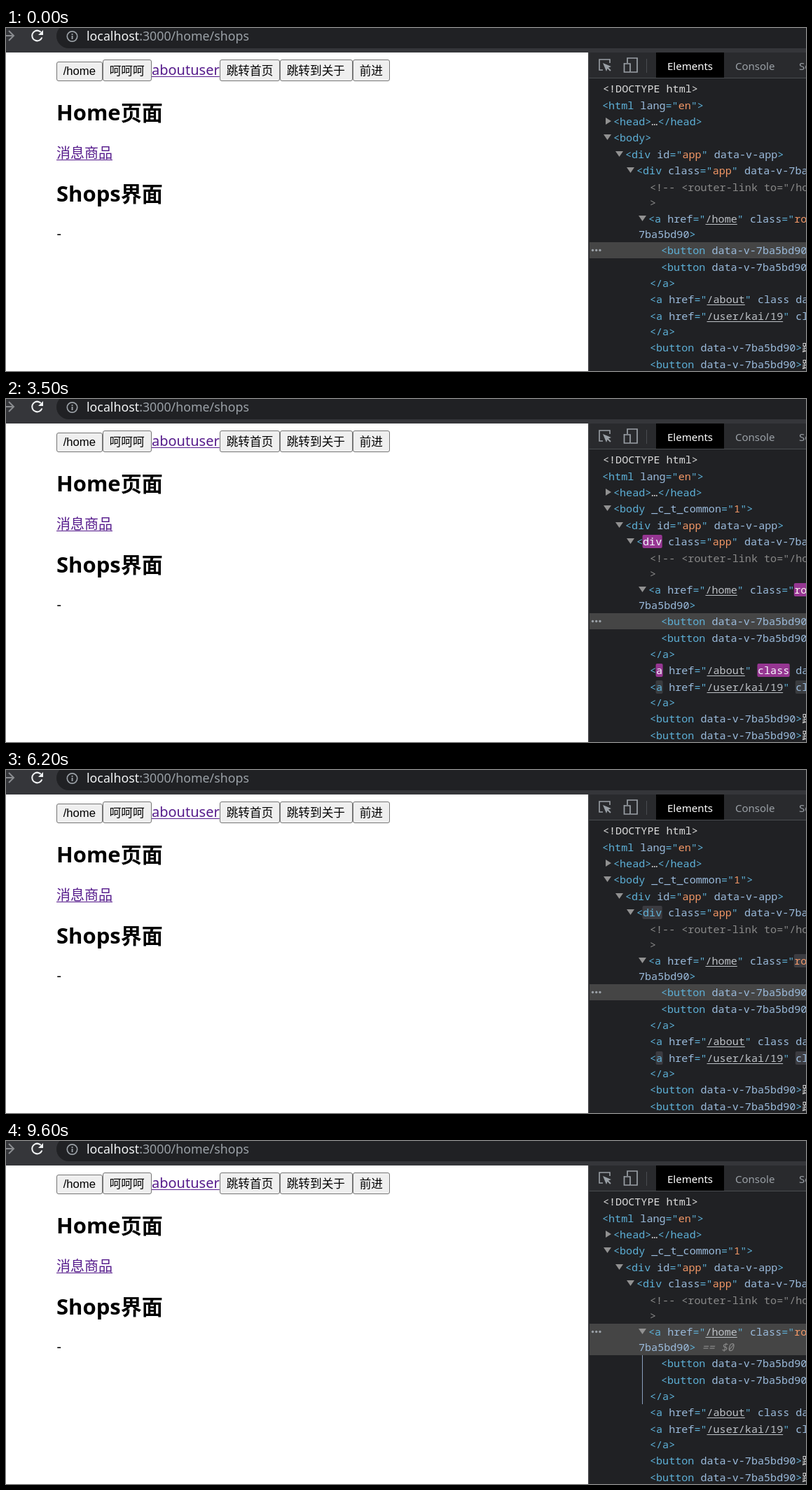
Write an HTML page with a canvas that moves like this. It is 1142 by 490 pixels and loops after 9700 ms.

```html
<!DOCTYPE html>
<html lang="zh">
<head>
<meta charset="utf-8">
<style>
html, body { margin: 0; width: 100%; height: 100%; overflow: hidden; background: #fff; }
canvas { display: block; width: 1142px; height: 490px; }
</style>
</head>
<body>
<canvas id="stage" width="1142" height="490"></canvas>
<script>
const ctx = document.getElementById('stage').getContext('2d');
const LOOP = 9700, STEP = 100, FLASH = 1400;
const SANS = '"Noto Sans", "Noto Sans CJK SC", "Noto Sans CJK", sans-serif';
const ARIAL = '"Liberation Sans", "Noto Sans CJK SC", "Noto Sans CJK", sans-serif';
const MONO = '15.1px "Noto Sans Mono", "Noto Sans CJK SC", "Noto Sans CJK", monospace';
const PANEL = '#202124';
const INK = { t: '#5db0d7', n: '#9bbbdc', v: '#f29766', l: '#bdc1c6', g: '#898989', w: '#dcdcdc', i: '#898989' };

// [start, state] lists
const PAGES = [[0, 'home'], [1700, 'user'], [2300, 'about'], [3300, 'home'], [4200, 'user'], [5200, 'home']];
const HOVERS = [[0, null], [6600, 'first'], [7100, 'link'], [7200, 'first'], [7700, 'second'],
  [7800, 'first'], [8300, 'link'], [8700, null]];
const FLASHES = {
  app: [1800, 2400, 3400, 4300, 5300], body: [1800],
  homeOff: [1800, 4300], homeOn: [3400, 5300],
  aboutOn: [2400], aboutOff: [3400],
  userOn: [1800, 4300], userOff: [2400, 5300]
};
const URLS = { home: '/home/shops', about: '/about', user: '/user/kai/19' };
const TARGETS = {
  first: { x: 72, y: 48, w: 66.3, h: 28, frame: true, name: 'button', size: '53.05 × 22' },
  second: { x: 138, y: 45, w: 70, h: 31, frame: true, name: 'button', size: '56 × 24.8' },
  link: { x: 72, y: 47, w: 136, h: 27, name: 'a', cls: '.router-link-active', size: '109.05 × 21' }
};

const stateAt = (list, t) => list.reduce((now, [start, s]) => t >= start ? s : now, list[0][1]);

function rect(x, y, w, h, fill) {
  ctx.fillStyle = fill;
  ctx.fillRect(x, y, w, h);
}
function round(x, y, w, h, r, fill, stroke) {
  ctx.beginPath();
  ctx.roundRect(x, y, w, h, r);
  if (fill) { ctx.fillStyle = fill; ctx.fill(); }
  if (stroke) { ctx.strokeStyle = stroke; ctx.lineWidth = 1; ctx.stroke(); }
}
function text(s, x, y, font, fill) {
  ctx.font = font;
  ctx.fillStyle = fill;
  ctx.fillText(s, x, y);
  return ctx.measureText(s).width;
}
function lines(color, width, ...paths) {
  ctx.strokeStyle = color;
  ctx.lineWidth = width;
  for (const p of paths) {
    ctx.beginPath();
    for (let i = 0; i < p.length; i += 2) ctx.lineTo(p[i], p[i + 1]);
    ctx.stroke();
  }
}
function poly(fill, ...p) {
  ctx.beginPath();
  for (let i = 0; i < p.length; i += 2) ctx.lineTo(p[i], p[i + 1]);
  ctx.fillStyle = fill;
  ctx.fill();
}
function ring(x, y, r, color, width, from = 0, to = Math.PI * 2) {
  ctx.beginPath();
  ctx.arc(x, y, r, from, to);
  ctx.strokeStyle = color;
  ctx.lineWidth = width;
  ctx.stroke();
}
function mix(a, b, k) {
  const part = (c, i) => parseInt(c.slice(1 + 2 * i, 3 + 2 * i), 16);
  return `rgb(${[0, 1, 2].map(i => Math.round(part(a, i) + (part(b, i) - part(a, i)) * k))})`;
}
// CSS "ease", solved by bisection
function ease(x) {
  const bez = (a, b, u) => 3 * a * u * (1 - u) ** 2 + 3 * b * u * u * (1 - u) + u ** 3;
  let lo = 0, hi = 1;
  for (let i = 0; i < 20; i++) {
    const mid = (lo + hi) / 2;
    if (bez(.25, .25, mid) < x) lo = mid; else hi = mid;
  }
  return bez(.1, 1, lo);
}

function drawBrowserBar(page) {
  rect(0, 0, 1142, 35, '#35363a');
  round(72, -6, 1100, 35, 17.5, PANEL);
  lines('#8a8c90', 2, [-4, 11, 11, 11], [4, 4, 11, 11, 4, 18]);
  ring(44.5, 11, 7.3, '#f1f3f4', 2.1, .35, 5.5);
  poly('#f1f3f4', 53, 3, 53, 10, 46, 10);
  ring(94.5, 12, 7.2, '#9aa0a6', 1.7);
  rect(93.6, 11, 1.9, 5, '#9aa0a6');
  rect(93.6, 8, 1.9, 1.9, '#9aa0a6');
  const font = '17.8px ' + SANS;
  const w = text('localhost', 115, 18, font, '#f1f3f4');
  text(':3000' + URLS[page], 115 + w, 18, font, '#9aa0a6');
}

function button(label, x, y, w) {
  round(x + .5, y + .5, w - 1, 75 - y, 2.5, '#efefef', '#767676');
  text(label, x + 9.7, 67, '16.67px ' + ARIAL, '#000');
}
function anchor(label, x, y) {
  const w = text(label, x, y, '20px ' + SANS, '#551a8b');
  rect(x, y + 2, w, 1, '#551a8b');
  return w;
}
// Latin runs are set slightly larger than Chinese ones.
function heading(s, x, y) {
  for (const run of s.match(/[\x20-\x7e]+|[^\x20-\x7e]+/g)) {
    const size = run < '\x7f' ? 31 : 30;
    x += text(run, x, y, `bold ${size}px ${SANS}`, '#000');
  }
}

function drawPage(page) {
  rect(0, 35, 832, 455, '#fff');
  button('/home', 72, 48, 66);
  button('呵呵呵', 138, 45, 70);
  const w = anchor('about', 208, 67);
  anchor('user', 208 + w, 67);
  button('跳转首页', 305, 45, 86);
  button('跳转到关于', 391, 45, 104);
  button('前进', 495, 45, 53);
  if (page === 'user') heading('欢迎你:kai-19', 72, 132);
  else if (page === 'about') heading('About界面', 72, 132);
  else {
    heading('Home页面', 72, 132);
    anchor('消息商品', 72, 186);
    heading('Shops界面', 72, 248);
    text('-', 72.5, 301, '20px ' + SANS, '#000');
  }
}

function drawInspect(target) {
  const { x, y, w, h, frame, name, cls = '', size } = target;
  const content = 'rgba(111,168,220,.66)';
  if (frame) {
    const band = (dx, dy, dx2, dy2, fill) => {
      ctx.beginPath();
      ctx.rect(x + dx, y + dy, w - 2 * dx, h - 2 * dy);
      ctx.rect(x + dx2, y + dy2, w - 2 * dx2, h - 2 * dy2);
      ctx.fillStyle = fill;
      ctx.fill('evenodd');
    };
    band(0, 0, 2.5, 2.5, 'rgba(255,229,153,.66)');
    band(2.5, 2.5, 10, 3.8, 'rgba(147,196,125,.55)');
    rect(x + 10, y + 3.8, w - 20, h - 7.6, content);
  } else rect(x, y, w, h, content);

  const bold = 'bold 15px ' + SANS, plain = '15px ' + SANS;
  ctx.font = bold;
  const nameW = ctx.measureText(name + cls).width;
  ctx.font = plain;
  const boxW = nameW + ctx.measureText(size).width + 35.5;
  ctx.save();
  ctx.shadowColor = 'rgba(0,0,0,.32)';
  ctx.shadowBlur = 8;
  ctx.shadowOffsetY = 1;
  round(x, 85, boxW, 37.5, 3, '#fff');
  ctx.restore();
  poly('#fff', x + 14, 86, x + 23.5, 76.5, x + 33, 86);
  const tagW = text(name, x + 11, 111, bold, '#881280');
  text(cls, x + 11 + tagW, 111, bold, '#1a1aa6');
  text(size, x + 24.5 + nameW, 111, plain, '#737373');
}

// Row markup: "|" starts a piece, its first letter is the ink, "@key" makes it flash.
const ID = '|n data-v-7ba5bd90';
const attr = (name, value, ink = 'v') => `|n ${name}|t="|${ink}${value}|t"`;
const href = path => attr('href', path, 'l');
const cls = value => `|n class|t="|v${value}`;

function domRows(page, marked, selected) {
  const tail = selected === 'link' ? '|i == $0' : '';
  const plainButton = 't<button' + ID + '|t>';
  const close = 't</a|t>';
  const rows = [
    [852, 92, 'w<!DOCTYPE html>'],
    [851, 116, 't<html' + attr('lang', 'en') + '|t>'],
    [867, 139, 't<head>|w…|t</head>', 'right'],
    [867, 162, 't<body' + (marked ? attr('_c_t_common', '1@body') : '') + '|t>', 'down'],
    [884, 186, 't<div' + attr('id', 'app') + '|n data-v-app|t>', 'down'],
    [900, 209, 't<|tdiv@app' + attr('class', 'app') + ID + '|t>', 'down'],
    [919, 233, 'g<!-- <router-link to="/home"'],
    [919, 255, 'g>']
  ];
  const home = 't<a' + href('/home'), about = href('/about'), user = href(URLS.user);
  if (page === 'home') rows.push(
    [917, 278, home + cls('router-link-active@homeOn') + '|t"', 'down'],
    [903, 300, 'n7ba5bd90|t>' + tail]);
  else rows.push([917, 278, home + '|n |nclass@homeOff' + ID, 'down']);
  const d = page === 'home' ? 0 : -22;
  rows.push([935, 323 + d, plainButton], [935, 347 + d, plainButton], [919, 370 + d, close]);

  if (page === 'about') rows.push(
    [919, 371, 't<a' + about + cls('router-@aboutOn')],
    [919, 393, 'vlink-exact-active@aboutOn|t"' + ID],
    [919, 415, 'vage@aboutOn|t">|wabout|t</a>']);
  else rows.push([919, 393 + d, 't<|ta@aboutOff' + about + '|n |nclass@aboutOff' + ID]);

  if (page === 'user') rows.push(
    [919, 395, 't<a' + user + cls('r')],
    [919, 417, 'vouter-link-exact-active@userOn|t"' + ID],
    [919, 439, 'ncurrent|t="|vpage@userOn|t">|wuser|t</a>']);
  else {
    const y = page === 'about' ? 439 : 417;
    rows.push([919, y, 't<|ta@userOff' + user + '|n |nclass@userOff' + ID], [919, y + 22, close]);
  }
  const y = page === 'about' ? 484 : 462;
  rows.push([919, y, plainButton + '|w跳转首页'], [919, y + 24, plainButton + '|w跳转到关于']);
  return rows;
}

function flashAge(key, t) {
  const start = (FLASHES[key] || []).filter(s => s <= t).pop();
  return start === undefined ? 1 : (t - start) / FLASH;
}

function drawRow([x, y, markup, arrow], t) {
  if (arrow === 'right') poly('#919191', x - 11, y - 11, x - 3, y - 6, x - 11, y - 1);
  if (arrow === 'down') poly('#919191', x - 14, y - 10, x - 3, y - 10, x - 8.5, y - 2);
  for (const piece of markup.split('|')) {
    const [body, key] = piece.split('@');
    const ink = body[0], s = body.slice(1);
    const font = (ink === 'i' ? 'italic ' : '') + MONO;
    ctx.font = font;
    const w = ctx.measureText(s).width;
    const age = key ? flashAge(key, t) : 1;
    let color = INK[ink];
    if (age < 1) {
      const k = ease(Math.min(1, age / .8));
      const fill = age < .8 ? mix('#9e3699', '#3a3c3f', k) : mix('#3a3c3f', PANEL, (age - .8) / .2);
      round(x - .5, y - 15, w + 1, 19, 2, fill);
      color = mix('#ffffff', color, k);
    }
    text(s, x, y, font, color);
    if (ink === 'l') rect(x, y + 2, w, 1, color);
    x += w;
  }
}

function drawToolbar() {
  rect(832, 35, 310, 37, '#292a2d');
  rect(832, 71, 310, 1, '#494c50');
  const gray = '#9aa0a6';
  lines(gray, 1.6, [852, 60, 847, 60, 847, 45, 862, 45, 862, 50]);
  poly(gray, 852, 50, 864, 55, 859, 57, 857, 62);
  lines(gray, 2, [858, 56, 863, 61]);
  lines(gray, 1.7, [887, 50, 887, 43, 901, 43, 901, 63, 892, 63], [882.5, 51, 891, 51, 891, 63, 882.5, 63, 882.5, 50]);
  rect(914, 44, 1, 20, '#494c50');
  rect(928, 35, 97, 36, '#000');
  const font = '15px ' + SANS;
  text('Elements', 944, 60, font, '#fff');
  text('Console', 1041, 60, font, gray);
  text('Sources', 1132, 60, font, gray);
}

function drawPanel(t, page, hover) {
  rect(832, 35, 310, 455, PANEL);
  drawToolbar();
  const selected = t >= 8500 ? 'link' : 'first';
  const focused = t >= 7400 && t < 9600;
  const top = page === 'home' ? 306 : 284;
  const bands = { link: [261, 45], first: [top, 23], second: [top + 23, 24] };
  const band = (name, fill) => rect(833, bands[name][0], 309, bands[name][1], fill);
  if (hover && hover !== selected) band(hover, '#252b36');
  band(selected, focused ? '#043f6f' : '#454545');
  for (let i = 0; i < 3; i++) {
    ctx.beginPath();
    ctx.arc(837.5 + i * 5.2, bands[selected][0] + 11.5, 1.7, 0, 7);
    ctx.fillStyle = '#9aa0a6';
    ctx.fill();
  }
  if (selected === 'link') rect(908, 306, 1, 70, '#8aa0bd');
  for (const row of domRows(page, t >= 1800, selected)) drawRow(row, t);
  rect(831, 35, 1.5, 455, '#3c3d41');
}

function draw(now) {
  const t = Math.floor(now % LOOP / STEP) * STEP;
  const shown = stateAt(PAGES, t);
  const synced = stateAt(PAGES, t - 100);
  const hover = stateAt(HOVERS, t);
  drawBrowserBar(synced);
  drawPage(shown);
  if (hover) drawInspect(TARGETS[hover]);
  drawPanel(t, synced, hover);
}

const begin = performance.now();
function tick() {
  draw(performance.now() - begin);
  requestAnimationFrame(tick);
}
tick();
</script>
</body>
</html>
```
